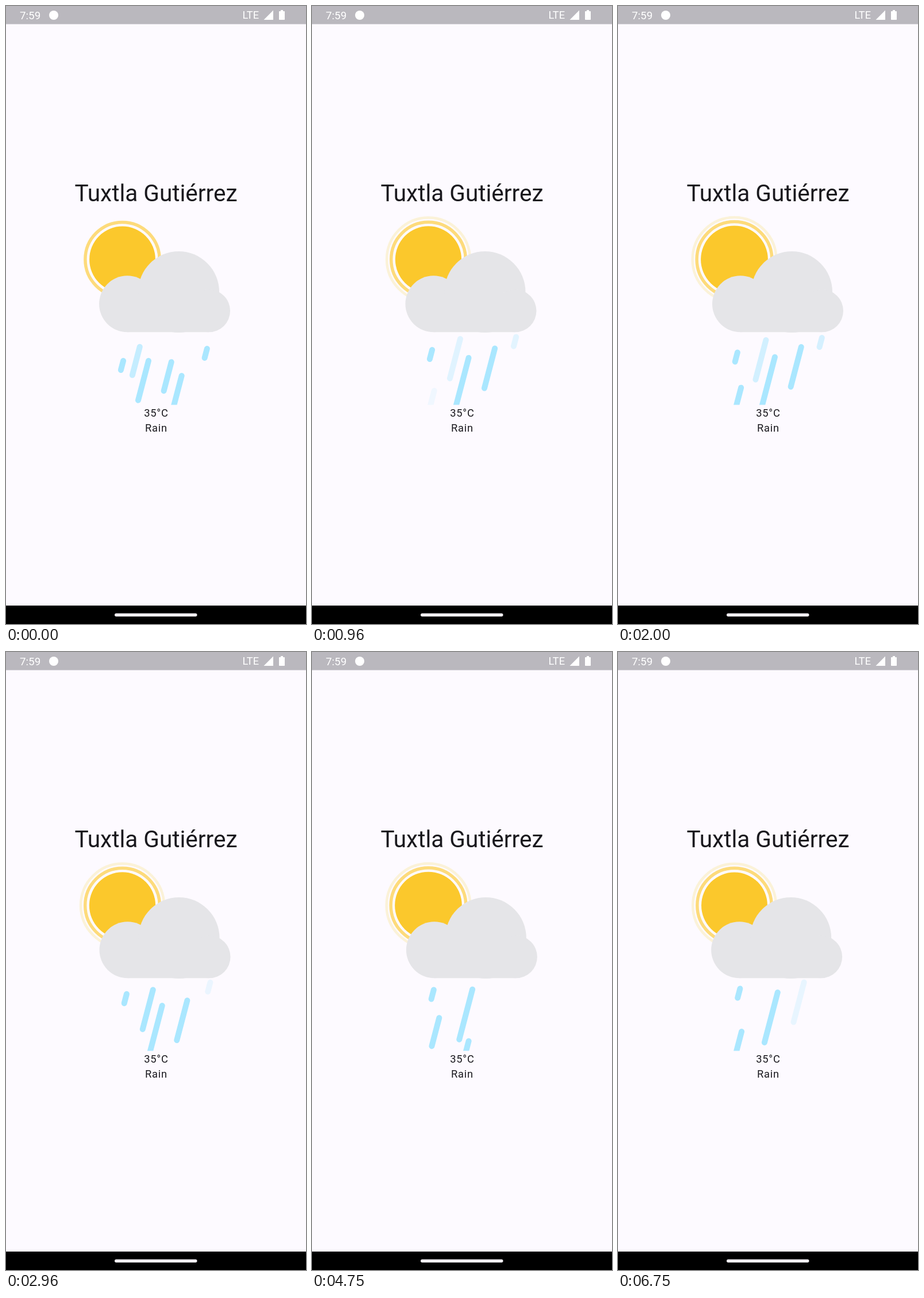
Recreate the animation shown at these times as an HTML page. Size 522x1073 px, loop 6830 ms.

```html
<!DOCTYPE html>
<html lang="en">
<head>
<meta charset="utf-8">
<title>Weather</title>
<style>
html, body { margin: 0; width: 100%; height: 100%; overflow: hidden; background: #fdfaff; }
svg { display: block; width: 100vw; height: 100vh; }
text { font-family: Roboto, sans-serif; fill: #1a191e; }
.bar, .bar text { fill: #fff; }
.mid { text-anchor: middle; }
.small { font-size: 18.3px; letter-spacing: .8px; }
</style>
</head>
<body>
<svg viewBox="0 0 522 1073">
  <defs><clipPath id="box"><path d="M120 360H402V692.5H120z"/></clipPath></defs>
  <rect width="522" height="1073" fill="#fdfaff"/>
  <rect width="522" height="31.5" fill="#bab8be"/>
  <g class="bar">
    <text x="24" y="23" font-size="18.8">7:59</text>
    <circle cx="83" cy="16" r="8"/>
    <text x="411.5" y="22.3" font-size="18.2">LTE</text>
    <path d="M465 7.5V24H448.5z"/>
    <path d="M478 7h4v2h2.2q.8 0 .8 .8V23.200q0 .8-.8 .8H475.800q-.8 0-.8-.8V9.800q0-.8 .8-.8H478z"/>
  </g>
  <text class="mid" x="261" y="338.500" font-size="40.500">Tuxtla Gutiérrez</text>

  <g fill="none" stroke="#fbc82c">
    <circle id="halo" cx="202.500" cy="440" stroke="#fbf2d8" stroke-width="4.500"/>
    <circle id="ring" cx="202.500" cy="440" stroke="#fddb7b" stroke-width="5.500"/>
    <circle id="sun" cx="202.500" cy="440" fill="#fbc82c" stroke="none"/>
  </g>
  <g id="rain" clip-path="url(#box)" stroke="#aae7ff" stroke-width="10" stroke-linecap="round"></g>
  <g id="cloud" fill="#e5e5e8">
    <circle cx="211" cy="517.300" r="49"/>
    <circle cx="300.500" cy="496.500" r="70.500"/>
    <circle cx="353" cy="529.300" r="37"/>
    <path d="M211 500H353V566.300H211z"/>
  </g>

  <text class="mid small" x="261.400" y="712.500">35°C</text>
  <text class="mid small" x="261.400" y="739">Rain</text>
  <rect y="1041" width="522" height="32"/>
  <rect x="189" y="1054.500" width="143.500" height="5.500" rx="2.750" fill="#f4f0f5"/>
</svg>
<script>
const LOOP = 6830, CYCLE = 3000, SLANT = -0.263;
const $ = id => document.getElementById(id);
const clamp = v => Math.max(0, Math.min(1, v));

// x is measured on the line y = 600; each drop falls three times per cycle
const drops = [
  { x: 208.3, len: 16, top: 570, fall: 57, life: 950, births: [510, 1475, 2563] },
  { x: 252.2, len: 68.5, top: 574, fall: 64, life: 800, births: [910, 1925, 2805] },
  { x: 275.4, len: 87, top: 566, fall: 76, life: 800, births: [488, 1543, 2455] },
  { x: 316.7, len: 69, top: 570, fall: 100, life: 1000, births: [715, 1780, 2610] },
  { x: 348.5, len: 16, top: 572, fall: 43, life: 750, births: [915, 1930, 2930] },
  { x: 292.5, len: 50, top: 575, fall: 110, life: 690, births: [60, 1120, 2100] },
  { x: 230.6, len: 49, top: 566, fall: 102, life: 740, births: [230, 1430, 2210], slows: true }
];
for (const d of drops) {
  d.line = document.createElementNS("http://www.w3.org/2000/svg", "line");
  $("rain").append(d.line);
}

function drawDrop(d, phase) {
  const age = Math.min(...d.births.map(b => (phase - b + CYCLE) % CYCLE));
  const u = clamp(age / d.life);
  const y = d.top + d.fall * (d.slows ? 1 - (1 - u) ** 2 : u);
  const x = d.x + (y - 600) * SLANT;
  const pose = {
    x1: x, y1: y, x2: x + d.len * SLANT, y2: y + d.len,
    opacity: Math.min(clamp(age / 150), clamp((d.life - age) / 60))
  };
  for (const key in pose) d.line.setAttribute(key, pose[key]);
}

function draw(now) {
  const t = now % LOOP;
  // the first second starts ahead and runs slower
  const phase = t < 960 ? 330 + t * 630 / 960 : t % CYCLE;
  const sway = 1 - Math.cos((phase - 480) / CYCLE * 2 * Math.PI);
  $("cloud").setAttribute("transform", `translate(${sway})`);
  $("sun").setAttribute("r", 57.4 + sway * 0.5);
  $("ring").setAttribute("r", 64.6 + sway * 0.4);
  $("halo").setAttribute("r", 72.3 + sway * 0.3);
  $("halo").setAttribute("opacity", clamp((t - 130) / 300));
  for (const d of drops) drawDrop(d, phase);
}

const start = performance.now();
function tick() {
  draw(performance.now() - start);
  requestAnimationFrame(tick);
}
tick();
</script>
</body>
</html>
```
